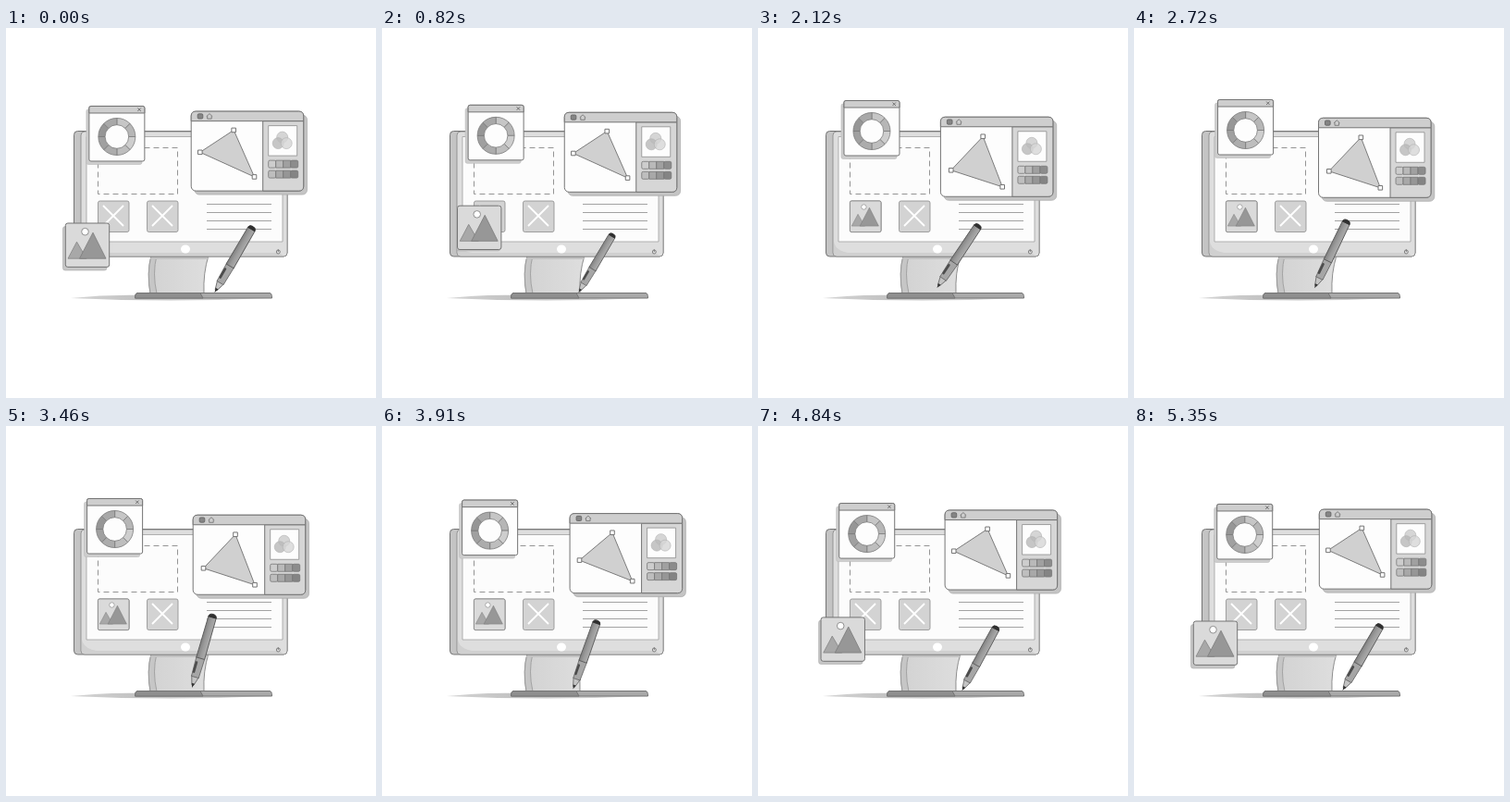
Animation of 400 by 400 pixels, one loop 5.38 s. Source, as an HTML page:

```html
<!DOCTYPE html>
<html lang="en">
<head>
<meta charset="utf-8">
<title>Design desk</title>
<style>
  html, body { margin: 0; width: 100%; height: 100%; overflow: hidden; background: #fff; }
  svg { display: block; width: 100vw; height: 100vh; }
  .ln { stroke: #747474; stroke-width: 1; }
  .thin { stroke: #8c8c8c; stroke-width: .8; }
</style>
</head>
<body>
<svg viewBox="0 0 400 400" fill="none" stroke-linejoin="round">
  <defs>
    <linearGradient id="neckFill" x1="0" x2="1">
      <stop offset="0" stop-color="#d2d2d2"/><stop offset="1" stop-color="#dedede"/>
    </linearGradient>
    <linearGradient id="floorFill" x1="0" x2="1">
      <stop offset="0" stop-color="#d4d4d4"/><stop offset=".35" stop-color="#c2c2c2"/><stop offset="1" stop-color="#d8d8d8"/>
    </linearGradient>
    <linearGradient id="penFill" x1="0" x2="1">
      <stop offset="0" stop-color="#808080"/><stop offset=".45" stop-color="#9a9a9a"/><stop offset="1" stop-color="#acacac"/>
    </linearGradient>
  </defs>

  <path d="M70 292 Q110 288 150 289 H282 V292 Q180 297 70 292Z" fill="url(#floorFill)"/>

  <!-- stand -->
  <path d="M157 246 Q152 265 156 287 H214 Q213 265 219 246Z" fill="url(#neckFill)" stroke="#828282" stroke-width=".9"/>
  <path d="M157 246 Q152 265 156 287 H163 Q158 265 163 246Z" fill="#c6c6c6" stroke="#909090" stroke-width=".7"/>
  <path d="M157 247 H219 L218 250 H156Z" fill="#c2c2c2"/>

  <!-- monitor -->
  <rect x="73.500" y="111.500" width="230.500" height="135.500" rx="4" fill="#c4c4c4" class="ln"/>
  <path d="M85 112 H300 Q304 112 304 116 V243 Q304 247 300 247 H85 Q81 247 81 243 V116 Q81 112 85 112Z" fill="#dedede" stroke="#858585" stroke-width=".8"/>
  <path d="M82 231 Q84 241 98 243 H290 Q296 243 300 246 H85 Q82 246 82 243Z" fill="#d0d0d0"/>
  <rect x="87" y="117.500" width="212" height="113.500" fill="#fcfcfc" stroke="#a0a0a0" stroke-width=".8"/>
  <ellipse cx="194" cy="239" rx="5" ry="4.500" fill="#fff"/>
  <circle cx="294.300" cy="242" r="2" stroke="#777" stroke-width=".9"/>
  <path d="M294.300 239.300 V242" stroke="#777" stroke-width=".9"/>

  <rect x="99.500" y="129.500" width="86" height="50" stroke="#949494" stroke-dasharray="6 4"/>
  <g id="slots"></g>
  <path d="M217 190.500 H287 M217 199.500 H287 M217 208.500 H287 M217 217.500 H287" stroke="#a2a2a2"/>

  <g id="ringWin"></g>
  <g id="card"></g>
  <g id="vectorWin"></g>
  <g id="pen">
    <path d="M-1 -3 L-4 -13 H4 L1 -3Z" fill="#c4c4c4" stroke="#666" stroke-width=".8"/>
    <path d="M0 0 L-1.600 -5 H1.600Z" fill="#333"/>
    <path d="M-4 -12 L-4.600 -34 H4.600 L4 -12Z" fill="#a6a6a6" stroke="#666" stroke-width=".8"/>
    <rect x="-4.200" y="-29" width="2.600" height="13" rx="1.200" fill="#4c4c4c"/>
    <path d="M-4.600 -33 L-4.300 -79 H4.300 L4.600 -33Z" fill="url(#penFill)" stroke="#5c5c5c" stroke-width=".9"/>
    <path d="M-4.400 -79 Q-4.200 -82.500 0 -82.500 Q4.200 -82.500 4.400 -79Z" fill="#2f2f2f" stroke="#2f2f2f" stroke-width=".8"/>
  </g>

  <!-- base -->
  <path d="M141.500 286.500 H285 Q287.500 286.500 287.500 292 H139.500 Q139.500 287.500 141.500 286.500Z" fill="#a9a9a9" class="ln"/>
  <path d="M141.500 286.500 H210 L213 292 H139.500 Q139.500 287.500 141.500 286.500Z" fill="#8f8f8f" class="ln"/>
</svg>

<script>
const LOOP = 5380, TAU = Math.PI * 2, PEN_LENGTH = 82.5;
const $ = id => document.getElementById(id);
const gray = v => `rgb(${v},${v},${v})`;
const box = (x, y, w, h, r, rest) => `<rect x="${x}" y="${y}" width="${w}" height="${h}" rx="${r}" ${rest}/>`;
const disc = (x, y, r, rest) => `<circle cx="${x}" cy="${y}" r="${r}" ${rest}/>`;
const path = (d, rest) => `<path d="${d}" ${rest}/>`;

// Image placeholders
$('slots').innerHTML = [99, 152].map(x =>
  box(x + .5, 187, 33.5, 33.5, 2, 'fill="#d3d3d3" class="thin"') +
  path(`M${x + 6} 192 l22 22 m0 -22 l-22 22`, 'stroke="#fff" stroke-width="1.8"')).join('');

// Ring chart window, drawn around its ring centre
const shades = [198, 182, 206, 190, 172, 160, 150, 168];
const at = (r, a) => `${(r * Math.cos(a)).toFixed(2)} ${(r * Math.sin(a)).toFixed(2)}`;
const wedges = shades.map((v, i) => {
  const a = i * TAU / 8 - TAU / 4, b = a + TAU / 8;
  return path(`M${at(20, a)} A20 20 0 0 1 ${at(20, b)} L${at(12.8, b)} A12.8 12.8 0 0 0 ${at(12.8, a)}Z`,
    `fill="${gray(v)}" stroke="#7a7a7a" stroke-width=".8"`);
}).join('');
$('ringWin').innerHTML =
  box(-33, -29.5, 60, 59.5, 2, 'fill="#cdcdcd" stroke="#bbb" stroke-width=".6"') +
  box(-30, -33, 60, 59.5, 2, 'fill="#fdfdfd" class="ln"') +
  path('M-30 -25.500 V-31 Q-30 -33 -28 -33 H28 Q30 -33 30 -31 V-25.500Z', 'fill="#cecece" class="ln"') +
  path('M22.500 -31 l3.500 3.500 m0 -3.500 l-3.500 3.500', 'stroke="#666" stroke-width=".9"') + wedges;

// Picture card, drawn around its centre
$('card').innerHTML =
  box(-23.7, -23.7, 47.4, 47.4, 2.5, 'id="cardShade" fill="#c6c6c6" stroke="#aaa" stroke-width=".6"') +
  box(-23.7, -23.7, 47.4, 47.4, 2.5, 'fill="#dadada" class="ln"') +
  path('M-21 14.500 L-11.500 -3.500 L-1 14.500Z', 'fill="#a8a8a8" stroke="#858585" stroke-width=".8"') +
  path('M-8.500 14.500 L6 -13.500 L20 14.500Z', 'fill="#979797" stroke="#7c7c7c" stroke-width=".8"') +
  disc(-2.5, -14.5, 3.8, 'fill="#fff" stroke="#858585" stroke-width=".9"');

// Vector editor window, drawn from its top left corner
const swatches = [[205, 185, 160, 140], [190, 168, 150, 132]].map((row, j) =>
  row.map((v, i) => box(83.5 + i * 8, 53 + j * 11, 8, 8, i % 3 ? 0 : 1.5,
    `fill="${gray(v)}" stroke="#777" stroke-width=".8"`)).join('')).join('');
const venn = [[98.5, 28, 202], [94, 34.5, 184], [103, 34.5, 214]].map(([x, y, v]) =>
  disc(x, y, 6, `fill="${gray(v)}" fill-opacity=".8" stroke="#b0b0b0" stroke-width=".6"`)).join('');
$('vectorWin').innerHTML =
  box(3.8, 4, 121.5, 86, 5, 'fill="#c4c4c4" stroke="#aaa" stroke-width=".7"') +
  box(0, 0, 121.5, 86, 5, 'fill="#fdfdfd" class="ln"') +
  path('M77.500 10.500 H121.500 V81 Q121.500 86 116.500 86 H77.500Z', 'fill="#d6d6d6" class="ln"') +
  path('M0 10.500 V5 Q0 0 5 0 H116.500 Q121.500 0 121.500 5 V10.500Z', 'fill="#cecece" class="ln"') +
  box(7, 2.7, 5.6, 5.2, 1.2, 'fill="#858585" stroke="#666" stroke-width=".9"') +
  path('M16.500 5.500 L19.800 2.500 L23 5.500 M17.500 5 V8 H22 V5', 'stroke="#777" stroke-width=".9"') +
  box(83.5, 15.5, 31, 32.5, 0, 'fill="#fdfdfd" class="thin"') + venn + swatches +
  '<path id="shape" fill="#d0d0d0" stroke="#7c7c7c"/>' +
  box(-2.3, -2.3, 4.6, 4.6, 0, 'class="knob ln" fill="#fff"').repeat(3);
const knobs = [...document.querySelectorAll('.knob')];

const mix = (a, b, k) => a + (b - a) * k;
const ramp = (t, a, b) => Math.min(1, Math.max(0, (t - a) / (b - a)));
const quad = u => u < .5 ? 2 * u * u : 1 - 2 * (1 - u) ** 2;
const cubic = u => u < .5 ? 4 * u ** 3 : 1 - 4 * (1 - u) ** 3;
const move = (id, x, y, extra = '') => $(id).setAttribute('transform', `translate(${x} ${y}) ${extra}`);

const poseA = [[46, 20.3], [9.6, 44.2], [68.3, 70.8]];
const poseB = [[45.8, 21], [11.3, 57.5], [66.8, 75.5]];

// Pen: time, cap x, cap y, tip x, tip y
const penKeys = [
  [0, 267, 214.5, 225.5, 286], [820, 250, 222.5, 212.5, 286], [1490, 240, 211.5, 203, 285.5],
  [2120, 239, 212.5, 193.5, 281], [3460, 224, 203.5, 201, 283], [4360, 246, 217.5, 213, 286]
];
const key = i => {
  const n = penKeys.length, k = penKeys[(i + n) % n];
  return [k[0] + LOOP * Math.floor(i / n), ...k.slice(1)];
};

// Smooth closed curve through the pen keys
function penAt(t) {
  const i = penKeys.findLastIndex(k => k[0] <= t);
  const [p, a, b, q] = [i - 1, i, i + 1, i + 2].map(key);
  const d = b[0] - a[0], u = (t - a[0]) / d;
  return [1, 2, 3, 4].map(c => {
    const m = (b[c] - p[c]) / (b[0] - p[0]) * d, n = (q[c] - a[c]) / (q[0] - a[0]) * d;
    return (2 * u ** 3 - 3 * u * u + 1) * a[c] + (u ** 3 - 2 * u * u + u) * m
      + (3 * u * u - 2 * u ** 3) * b[c] + (u ** 3 - u * u) * n;
  });
}

// Two brief rests in the loop
const hold = t => t >= 450 && t < 580 ? 450 : t >= 3270 && t < 3400 ? 3270 : t;

function draw(ms) {
  const t = hold(ms % LOOP), turn = (t - 100) / LOOP * TAU;
  const s = Math.sin(turn), c = Math.cos(turn);
  move('ringWin', 120.3 + 3.8 * s, 114 + 3.5 * c);
  move('vectorWin', 199.8 - 3.4 * s, 93.7 - 3.6 * c);

  const bend = quad(ramp(t, 1500, 2080)) - quad(ramp(t, 3500, 4300));
  const pts = poseA.map((p, i) => p.map((v, j) => mix(v, poseB[i][j], bend)));
  $('shape').setAttribute('d', `M${pts.join('L')}Z`);
  knobs.forEach((k, i) => k.setAttribute('transform', `translate(${pts[i]})`));

  const go = cubic(ramp(t, 400, 1180)) - quad(ramp(t, 3950, 5150));
  const shrink = quad(ramp(t, 800, 1300)) - quad(ramp(t, 4000, 4800));
  move('card', mix(88, 116.2, go), mix(234.7, 203.8, go), `scale(${mix(1, .71, shrink)})`);
  move('cardShade', -2.8 * (1 - go), 3.6 * (1 - go));

  const [capX, capY, tipX, tipY] = penAt(t), dx = capX - tipX, dy = tipY - capY;
  const lean = Math.atan2(dx, dy) * 360 / TAU;
  move('pen', tipX, tipY, `rotate(${lean}) scale(${Math.hypot(dx, dy) / PEN_LENGTH})`);
}

const start = performance.now();
function tick() {
  draw(performance.now() - start);
  requestAnimationFrame(tick);
}
tick();
</script>
</body>
</html>
```
